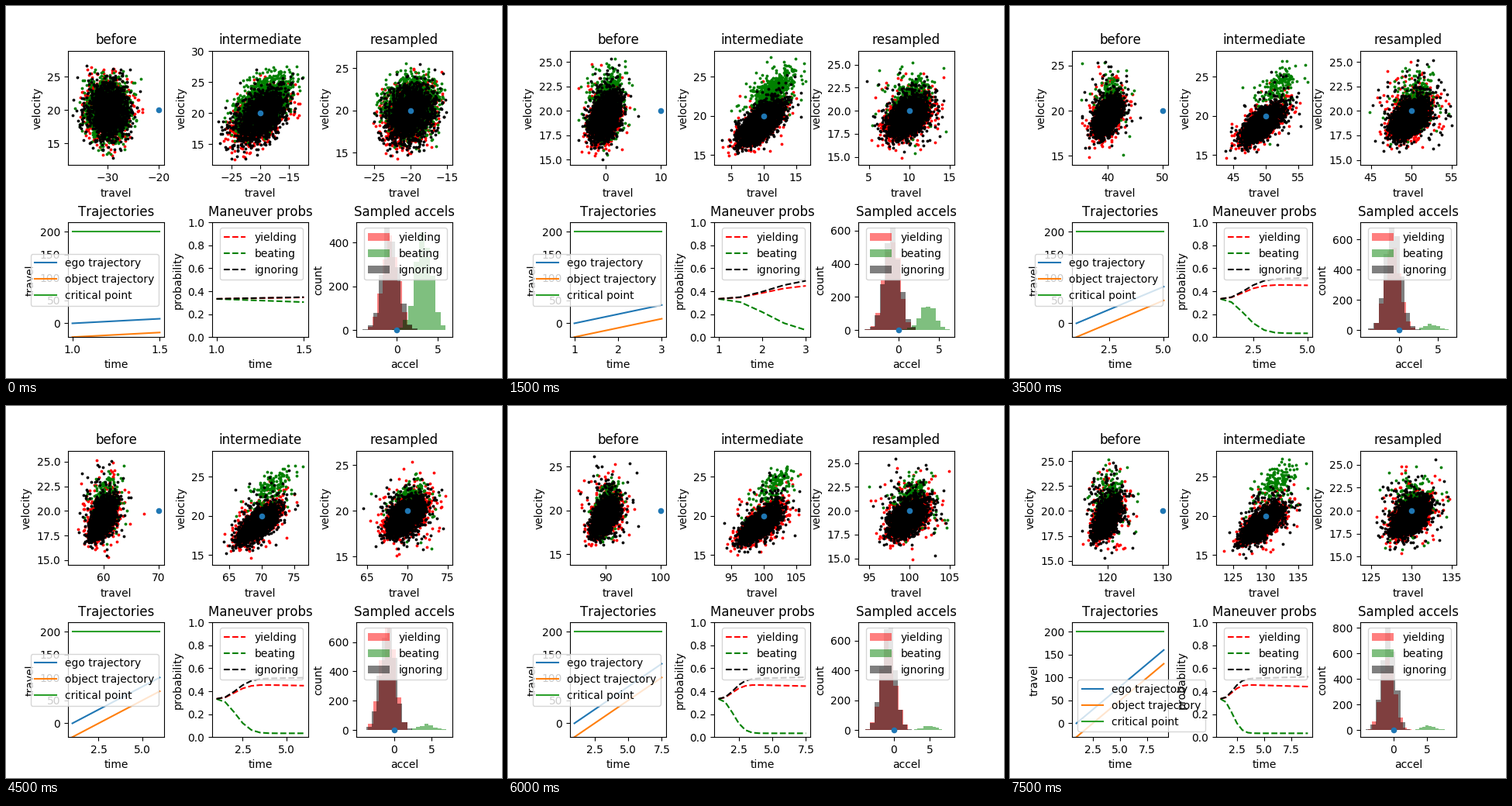
A matplotlib script that plays this animation: 640x480 px, repeating every 8000 ms.

```python
import numpy as np
import matplotlib.pyplot as plt
from matplotlib.animation import FuncAnimation

plt.rcParams["text.kerning_factor"] = 6

STEPS, TOTAL, DT = 16, 5000, 0.5
NAMES = ["yielding", "beating", "ignoring"]
COLORS = ["red", "green", "black"]

times = 1 + DT * np.arange(STEPS + 1)
since = times - 1
beating = 0.033 + 0.3 * np.exp(-0.48 * since ** 2.3)
yielding = 0.463 - 0.13 * np.exp(-0.55 * since ** 2.2) - 0.0028 * since
probs = np.array([yielding, beating, 1 - yielding - beating])


def velocity_range(k):
    """Vertical view of the particles at step k, swaying from step to step."""
    sway = np.cos(2 * np.pi * (k - 8.5) / 5.7)
    span = 12.7 - sway - 0.0025 * k ** 2 + 3.5 * np.exp(-2 * k)
    return 20.3 - span / 2, 20.3 + span / 2


def cloud(k):
    """Particles of step k: (offset, velocity, accel) for each maneuver."""
    rng = np.random.default_rng(100 + k)
    early = np.exp(-k / 2)
    late = 1 - early
    sx, sv, rho = 1.05 + 0.85 * early, 0.92 + 1.13 * early, 0.5 * late
    groups = []
    for m in range(3):
        n = int(TOTAL * probs[m, k])
        beat = m == 1
        a = rng.normal(3.2 + 0.135 * k if beat else -0.8, 0.95, n)
        zx, zv = rng.standard_normal((2, n))
        x = sx * zx + late * (0.4 if beat else -0.2)
        v = 20 + late * (1.9 if beat else -0.7) \
            + sv * (rho * zx + np.sqrt(1 - rho ** 2) * zv)
        stray = rng.random(n) < late * (0.4 if beat else 0.06)
        x = np.where(stray, 0.3 + 1.9 * zx, x)
        v = np.where(stray, 20.4 + 1.9 * zv, v)
        groups.append((x, v, a))
    return groups


def advance(groups):
    return [(x + DT * (v - 20) + DT ** 2 / 2 * a, v + DT * a, a)
            for x, v, a in groups]


def draw_cloud(ax, title, groups, center, target, xlim, ylim):
    mx, my = 0.045 * (xlim[1] - xlim[0]), 0.045 * (ylim[1] - ylim[0])
    for (x, v, _), color in zip(groups, COLORS):
        x = x + center
        keep = (x > xlim[0] + mx) & (x < xlim[1] - mx) \
            & (v > ylim[0] + my) & (v < ylim[1] - my)
        ax.scatter(x[keep], v[keep], s=3, c=color)
    ax.scatter([target], [20], s=20, c="C0")
    ax.set(title=title, xlabel="travel", ylabel="velocity",
           xlim=xlim, ylim=ylim)


def draw_particles(k, groups):
    target = -20 + 10 * k
    start = np.exp(-2 * k)
    width = 17.4 + 1.4 * start
    right = target + 0.0565 * width
    draw_cloud(axes[0, 0], "before", groups, target - 10, target,
               (right - width, right), velocity_range(k))
    draw_cloud(axes[0, 1], "intermediate", advance(groups), target, target,
               (target - 7.6 - 0.8 * start, target + 7.2 + 1.2 * start),
               (13.7 - 2.1 * start, 28.3 + 1.75 * start))
    draw_cloud(axes[0, 2], "resampled", cloud(k + 1), target, target,
               (target - 6.3 - 1.15 * start, target + 5.6 + 0.15 * start),
               velocity_range(k + 1))


def draw_paths(ax, k):
    t = times[:k + 2]
    ego = 20 * (t - 1)
    ax.plot(t, ego, label="ego trajectory")
    ax.plot(t, ego - 30, label="object trajectory")
    ax.plot(t, np.full_like(t, 200), label="critical point")
    ax.set(title="Trajectories", xlabel="time", ylabel="travel",
           ylim=(-30, 220))
    ax.legend(loc="center right" if k < STEPS - 1 else "lower left")


def draw_probs(ax, k):
    for p, name, color in zip(probs, NAMES, COLORS):
        ax.plot(times[:k + 2], p[:k + 2], "--", color=color, label=name)
    ax.set(title="Maneuver probs", xlabel="time", ylabel="probability",
           ylim=(0, 1))
    ax.legend(loc="upper right")


def draw_accels(ax, k, groups):
    peak = 0
    for (_, _, a), name, color in zip(groups, NAMES, COLORS):
        counts, _, _ = ax.hist(a, color=color, alpha=0.5, label=name)
        peak = max(peak, counts.max())
    ax.scatter([0], [0], s=20, c="C0")
    ax.set(title="Sampled accels", xlabel="accel", ylabel="count",
           xlim=(-4.97, 6.8 + 0.0115 * k ** 2),
           ylim=(-0.069 * peak, 1.053 * peak))
    ax.legend(loc="upper right")


fig, axes = plt.subplots(2, 3, figsize=(6.4, 4.8), dpi=100)
fig.subplots_adjust(left=0.125, right=0.9, bottom=0.11, top=0.88,
                    wspace=0.5, hspace=0.5)


def update(k):
    for ax in axes.flat:
        ax.clear()
    groups = cloud(k)
    draw_particles(k, groups)
    draw_paths(axes[1, 0], k)
    draw_probs(axes[1, 1], k)
    draw_accels(axes[1, 2], k, groups)
    return []


anim = FuncAnimation(fig, update, frames=STEPS, interval=500,
                     init_func=lambda: [], repeat=True, repeat_delay=0)
plt.show()
```
